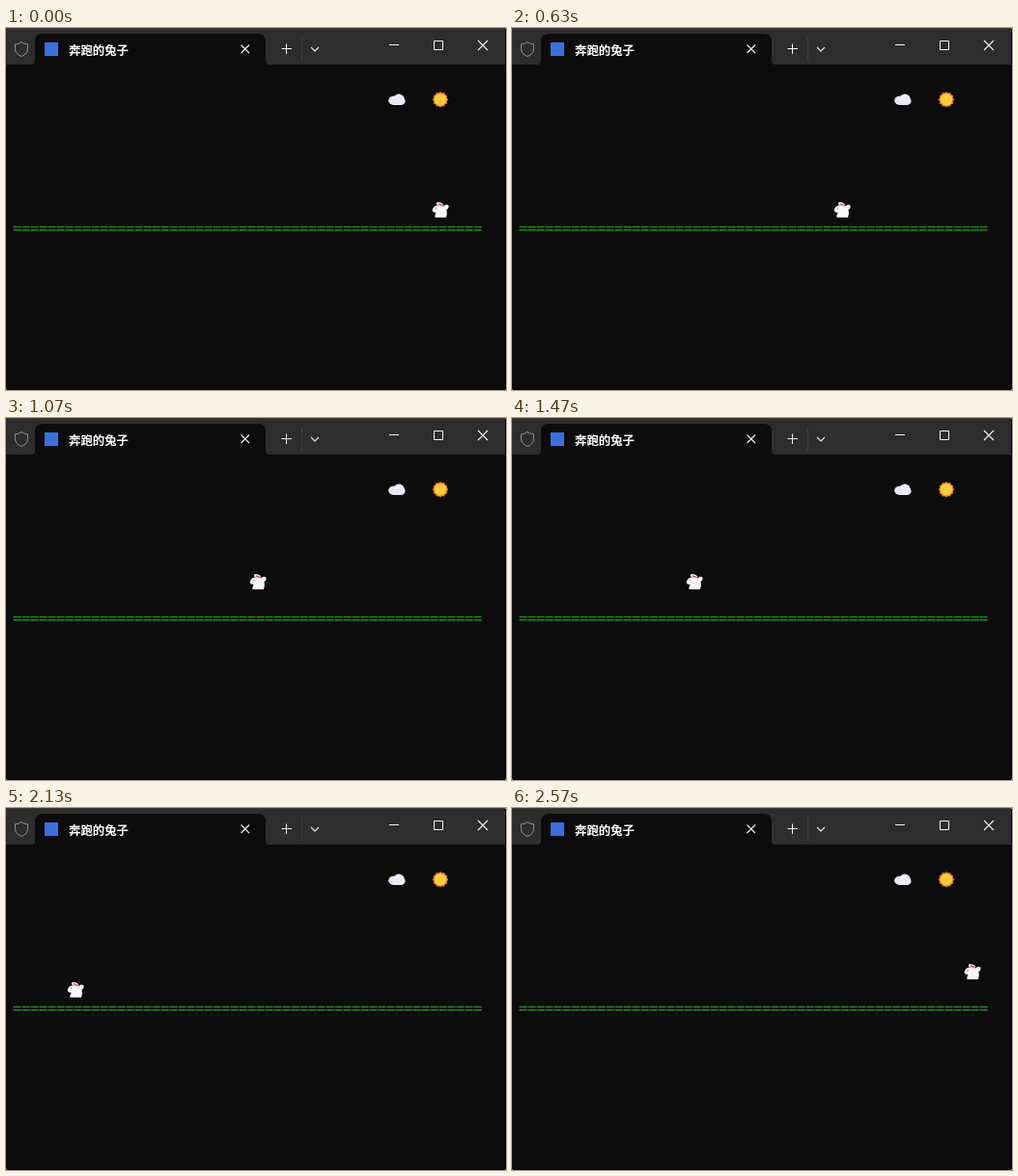
Animation, 518 px wide and 376 px high, one loop 2.6 s. Source, as an HTML page with a canvas:

```html
<!DOCTYPE html>
<html lang="zh">
<head>
<meta charset="utf-8">
<title>奔跑的兔子</title>
<style>
  html, body { margin: 0; width: 100%; height: 100%; overflow: hidden; background: #0c0c0c; }
  canvas { display: block; }
</style>
</head>
<body>
<canvas id="stage" width="518" height="376"></canvas>
<script>
const ctx = document.getElementById('stage').getContext('2d');
const LOOP = 2600;
const CELL = 9;

// [time, column]; the rabbit enters a new column each time a whole number is reached.
const RUN = [[0, 50], [30, 49], [570, 39], [1070, 29], [1130, 28], [1170, 27], [1470, 21],
  [1630, 18], [1670, 17], [1770, 15], [2130, 8], [2170, 7], [2230, 6], [2430, 2],
  [2480, 1], [2570, -1], [2630, -2]];

// [time, x, y] of the pointer tip
const POINTER = [[1600, 331, 326], [1640, 333, 324], [1740, 346, 312], [1820, 346, 312], [1960, 354, 377]];

function at(keys, t, field) {
  const i = Math.max(1, keys.findIndex(k => k[0] > t));
  const a = keys[i - 1], b = keys[i];
  return a[field] + (b[field] - a[field]) * (t - a[0]) / (b[0] - a[0]);
}

function rect(x, y, w, h, color) {
  ctx.fillStyle = color;
  ctx.fillRect(x, y, w, h);
}

function ellipse(x, y, rx, ry, color, turn = 0) {
  ctx.fillStyle = color;
  ctx.beginPath();
  ctx.ellipse(x, y, rx, ry, turn, 0, Math.PI * 2);
  ctx.fill();
}

function stroke(d, color = '#f4f4f4', width = 1) {
  ctx.strokeStyle = color;
  ctx.lineWidth = width;
  ctx.lineJoin = 'round';
  ctx.stroke(new Path2D(d));
}

function fill(d, color) {
  ctx.fillStyle = color;
  ctx.fill(new Path2D(d));
}

function titleBar() {
  rect(0, 0, 518, 38, '#2d2d2d');
  rect(0, 0, 518, 1, '#383838');
  fill('M26 38Q30 38 30 34V14Q30 6 38 6H261Q269 6 269 14V34Q269 38 273 38Z', '#0c0c0c');
  stroke('M16 14.5Q18.5 16.7 22.5 16.8V21.5Q22.5 27 16 29.5Q9.5 27 9.5 21.5V16.8Q13.5 16.7 16 14.5Z', '#929292');
  rect(40, 15, 14, 14, '#3c70d8');
  ctx.fillStyle = '#fff';
  ctx.font = '700 12.4px "Noto Sans CJK SC", "Noto Sans CJK", sans-serif';
  ctx.fillText('奔跑的兔子', 65, 27.5);
  stroke('M243.5 17.5L252 26M252 17.5L243.5 26', '#f4f4f4', 1.1);
  stroke('M285.5 21.5H296M290.5 16.5V27');
  stroke('M306.5 10V34', '#414141');
  stroke('M316 20L320 24L324 20', '#e4e4e4', 1.1);
  stroke('M397 17.5H407');
  stroke('M443.5 13.5H452.5V22.5H443.5Z');
  stroke('M489 13L499 23M499 13L489 23', '#f4f4f4', 1.1);
}

function sky() {
  ellipse(401.5, 75.3, 5.3, 4.6, '#e8e6f6');
  ellipse(407, 73.9, 5.7, 5.3, '#f0effb');
  ellipse(409, 75.9, 4.6, 4.2, '#eceaf9');
  rect(401, 74, 8, 6, '#eae8f7');

  ctx.fillStyle = '#e97030';
  ctx.beginPath();
  for (let i = 0; i < 24; i++) {
    const r = i % 2 ? 7.1 : 8.3, angle = i * Math.PI / 12;
    ctx.lineTo(450 + r * Math.cos(angle), 74.3 + r * Math.sin(angle));
  }
  ctx.fill();
  ellipse(450, 74.3, 6.3, 6.3, '#fdcd3e');
}

function ground() {
  for (let i = 0; i < 54; i++) {
    rect(7.5 + i * CELL, 205.8, 8.2, 1.6, '#238022');
    rect(7.5 + i * CELL, 209, 8.2, 1.6, '#238022');
  }
}

function rabbit(x, y) {
  ctx.save();
  ctx.translate(x, y);
  fill('M-8.3 .5Q-7.5 -4 -3 -4.5L4 -4Q6 -6 8.5 -4.5Q9 -1.5 6.5 0Q7.5 4 6 8H-5.5Q-6 6 -4.5 3Q-8 3 -8.3 .5Z', '#f9f6f8');
  ellipse(-.5, -5.6, 3.8, 1.9, '#efe8ec', .35);
  ellipse(.8, -4.8, 3.4, 1.1, '#bd6472', .4);
  ellipse(2, -3, 2.8, 1, '#eee6eb', .35);
  ellipse(-4.8, -1.4, .6, .7, '#6b6068');
  ellipse(-8, .2, .5, .5, '#dc8795');
  ctx.restore();
}

function pointer(t) {
  if (t < POINTER[0][0] || t >= POINTER[POINTER.length - 1][0]) return;
  ctx.save();
  ctx.translate(at(POINTER, t, 1), at(POINTER, t, 2));
  const arrow = 'M0 0V16L3.7 12.6L6.2 18.4L8.7 17.3L6.2 11.6H11.3Z';
  fill(arrow, '#fff');
  stroke(arrow, '#111', .8);
  ctx.restore();
}

function windowEdge() {
  rect(517, 0, 1, 376, '#000');
  rect(0, 375, 518, 1, '#000');
  for (const [x, y] of [[517, 0], [0, 375], [517, 375]]) rect(x, y, 1, 1, '#8a8a8a');
}

function frame(t) {
  rect(0, 0, 518, 376, '#0c0c0c');
  titleBar();
  sky();
  ground();
  const step = Math.ceil(at(RUN, t, 1) - 1e-6);
  const column = step < 2 ? step + 54 : step;
  rabbit(column * CELL, column % 2 ? 170 : 188.7);
  pointer(t);
  windowEdge();
}

function tick() {
  frame(performance.now() % LOOP);
  requestAnimationFrame(tick);
}
tick();
</script>
</body>
</html>
```
